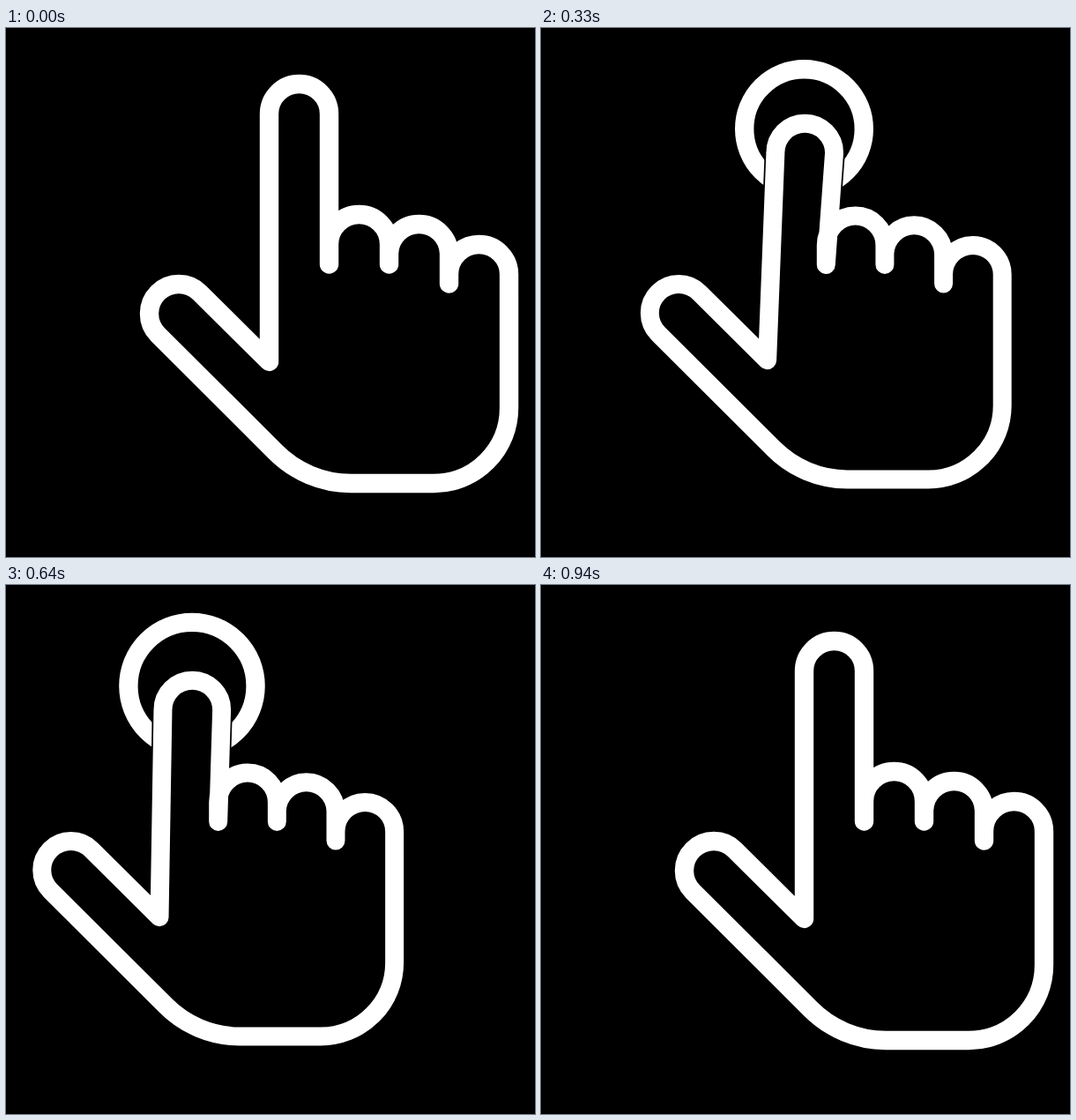
Animation, 600 px wide and 600 px high, one loop 1180 ms. Source, as an HTML page:

```html
<!DOCTYPE html>
<html lang="en">
<head>
<meta charset="utf-8">
<title>Press and drag</title>
<style>
  html, body { margin: 0; width: 100%; height: 100%; overflow: hidden; background: #000; }
  svg { display: block; width: 100vw; height: 100vh; }
  path { stroke-linecap: round; stroke-linejoin: round; }
</style>
</head>
<body>
<svg viewBox="0 0 600 600">
  <circle id="ring" cy="114.5" fill="none" stroke="#fff" stroke-width="21.4"/>
  <g id="hand">
    <path fill="#000" stroke="#000" stroke-width="25"/>
    <path fill="none" stroke="#fff" stroke-width="21.4"/>
  </g>
</svg>
<script>
const LOOP = 1180, STEP = 30, END = 930;
const CX = 366.5, CY = 290;

const ramp = (t, from, to) => Math.min(1, Math.max(0, (t - from) / (to - from)));
const smooth = (t, from, to) => {
  const u = ramp(t, from, to);
  return u * u * (3 - 2 * u);
};
const easeOut = (t, from, to) => 1 - (1 - ramp(t, from, to)) ** 3;

// Motion runs in even steps; the clock rests for 10 ms before 490 ms.
function stepTime(t) {
  const clock = t < 490 ? Math.min(t, 479) : t - 10;
  return Math.min(END, Math.floor(clock / STEP) * STEP);
}

// A knuckle arch from its right foot to its left foot.
const knuckle = (x, y, rightY, leftY) =>
  `M${x + 34} ${rightY}V${y}A34 34 0 0 0 ${x - 34} ${y}V${leftY}`;

function handPath(tipY, lean) {
  return `M366.5 268L${366.5 + lean} ${tipY}
    A34 34 0 0 0 ${298.5 + lean} ${tipY}L298.5 378.5L219.7 300.3
    A33.5 33.5 0 0 0 172.3 347.7L305.5 480.6
    A121 121 0 0 0 391 516.5H485A85.5 85.5 0 0 0 570.5 431V279.5`
    + knuckle(536.5, 279.5, 290, 290)
    + knuckle(468.5, 256.5, 290, 268)
    + knuckle(400.5, 245.5, 268, 268);
}

const ring = document.getElementById("ring");
const hand = document.getElementById("hand");

function draw(t) {
  const press = smooth(t, 0, 245) - smooth(t, 765, END);
  const shift = -136 * (ramp(t, 173, 667) - smooth(t, 753, END));
  const lean = 16 * (smooth(t, 215, 420) - ramp(t, 420, 700));
  const radius = 77 * easeOut(t, 100, 340) + .0143 * (t - 240) + 21 * smooth(t, 680, 810);

  const scale = 1 - .02 * press;
  const x = CX + shift;
  const d = handPath(97.5 + 41 * press, lean);
  for (const part of hand.children) part.setAttribute("d", d);
  hand.setAttribute("transform",
    `translate(${x} ${CY}) scale(${scale}) translate(${-CX} ${-CY})`);

  ring.setAttribute("cx", x + (.92 * lean - 34) * scale);
  ring.setAttribute("r", Math.max(0, radius - 10.5));
  ring.style.display = t > 100 && t < 840 ? "" : "none";
}

const start = performance.now();
function tick() {
  draw(stepTime((performance.now() - start) % LOOP));
  requestAnimationFrame(tick);
}
tick();
</script>
</body>
</html>
```
